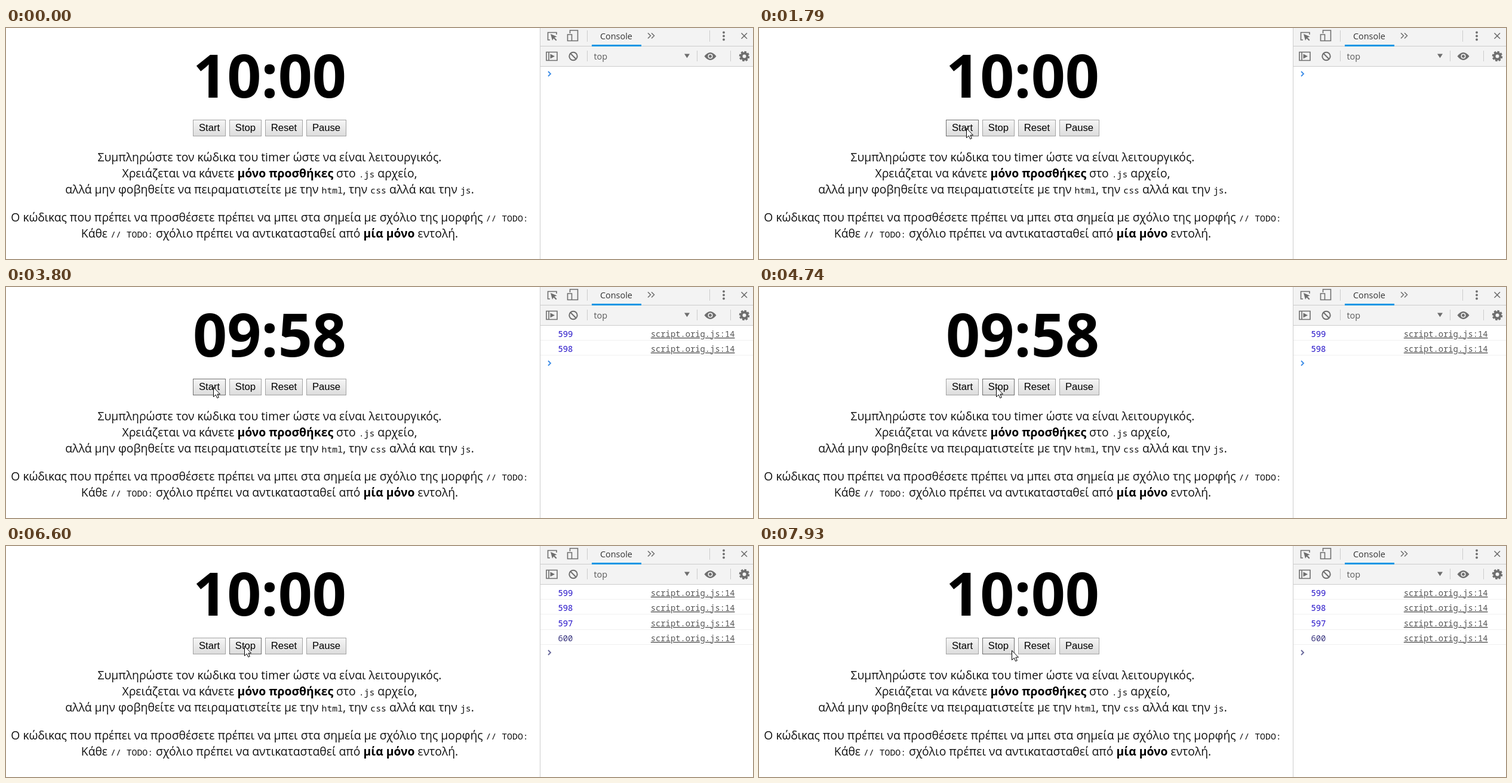
An HTML page for the animation above (8 s loop, 1251x388 px).

```html
<!DOCTYPE html>
<html lang="el">
<head>
<meta charset="utf-8">
<title>Timer</title>
<style>
  html, body { margin: 0; width: 100%; height: 100%; overflow: hidden; background: #fff; }
  svg { display: block; }
  text { font-family: "Open Sans", "Noto Sans", sans-serif; white-space: pre; }
  .clock { font-size: 100px; font-weight: 700; text-anchor: middle; }
  .body { font-size: 19.32px; text-anchor: middle; fill: #111; }
  .b { font-weight: 700; fill: #000; }
  .m { font: 14.8px "Noto Sans Mono", monospace; }
  .button text { font: 16.67px "Liberation Sans", Arial, sans-serif; text-anchor: middle; }
  .button rect { fill: url(#up); stroke: #a3a3a3; }
  .button.hover rect { stroke: #707070; }
  .button.pressed rect { fill: url(#down); stroke: #b4b4b4; }
  .row text { font: 13.8px "Noto Sans Mono", monospace; }
  .tool { font-size: 14.4px; }
  .line { fill: none; stroke: #6e6e6e; stroke-width: 1.6; }
  .solid { fill: #6e6e6e; }
  .rule { fill: none; stroke: #ccc; }
</style>
</head>
<body>
<svg width="1251" height="388" viewBox="0 0 1251 388">
  <defs>
    <linearGradient id="up" x2="0" y2="1"><stop stop-color="#f6f6f6"/><stop offset="1" stop-color="#dcdcdc"/></linearGradient>
    <linearGradient id="down" x2="0" y2="1"><stop stop-color="#dcdcdc"/><stop offset="1" stop-color="#f8f8f8"/></linearGradient>
  </defs>

  <text id="clock" class="clock" x="441.5" y="117"></text>
  <g id="buttons"></g>

  <text class="body" x="441.5" y="224">Συμπληρώστε τον κώδικα του timer ώστε να είναι λειτουργικός.</text>
  <text class="body" x="441.5" y="251">Χρειάζεται να κάνετε <tspan class="b">μόνο προσθήκες</tspan> στο <tspan class="m">.js</tspan> αρχείο,</text>
  <text class="body" x="441.5" y="278">αλλά μην φοβηθείτε να πειραματιστείτε με την <tspan class="m">html</tspan>, την <tspan class="m">css</tspan> αλλά και την <tspan class="m">js</tspan>.</text>
  <text class="body" x="441.5" y="325">Ο κώδικας που πρέπει να προσθέσετε πρέπει να μπει στα σημεία με σχόλιο της μορφής <tspan class="m">// TODO:</tspan></text>
  <text class="body" x="441.5" y="352">Κάθε <tspan class="m">// TODO:</tspan> σχόλιο πρέπει να αντικατασταθεί από <tspan class="b">μία μόνο</tspan> εντολή.</text>

  <!-- Console panel -->
  <rect x="895" width="356" height="388" fill="#fff"/>
  <rect x="895" width="356" height="64" fill="#f3f3f3"/>
  <path class="rule" d="M894.5 0V388M895 30.5H1251M895 64.5H1251M973.5 4V23M1178.5 4V23M973.5 38V56M1157.5 38V56M1213.5 38V56"/>
  <rect x="981" y="28" width="83" height="3" fill="#0a96e4"/>
  <text class="tool" x="995" y="19" fill="#333">Console</text>
  <text class="tool" x="984.5" y="53" fill="#5a5a5a">top</text>

  <path class="line" d="M922 11V7.5H907.5V20H911M1075 8.5L1079.5 13L1075 17.5M1081 8.5L1085.5 13L1081 17.5M1231.5 8.5L1241 18M1241 8.5L1231.5 18"/>
  <path class="solid" d="M912 10L922.5 14.5L918.5 16L922.5 20L921 21.5L917 17.5L915 21Z"/>
  <path class="line" d="M944.5 9V4H957.5V21.5H948M940.5 11H947.5V21.5H940.5Z"/>
  <g class="solid">
    <circle cx="1202" cy="7.5" r="1.9"/><circle cx="1202" cy="13.5" r="1.9"/><circle cx="1202" cy="19.5" r="1.9"/>
    <path d="M911.5 43.5L919 47.5L911.5 51.5ZM1136 43.5H1145L1140.5 50.5Z"/>
  </g>
  <path class="line" d="M905 40.5H923V54.5H905ZM909 40.5V54.5"/>
  <g class="line" style="stroke-width:2"><circle cx="950" cy="47.5" r="6.7"/><path d="M945.5 43L954.5 52"/></g>
  <path class="solid" d="M1169.5 47.5Q1179.5 34.5 1189.5 47.5Q1179.5 60.5 1169.5 47.5Z"/>
  <circle cx="1179.5" cy="47.5" r="3.3" fill="#6e6e6e" stroke="#f3f3f3" stroke-width="1.6"/>
  <g fill="none" stroke="#6e6e6e">
    <circle cx="1236.5" cy="47.5" r="5" stroke-width="4"/>
    <circle cx="1236.5" cy="47.5" r="7.6" stroke-width="2.4" pathLength="16" stroke-dasharray="1.2 .8"/>
  </g>

  <g id="rows"></g>
  <path id="prompt" d="M908 73L912 77L908 81" fill="none" stroke-width="1.8"/>

  <circle id="ring" r="15.5" fill="#f2e83c" fill-opacity=".72"/>
  <path id="arrow" d="M.5 .5V16.5L4.3 13L6.7 18.5L9.3 17.4L6.9 12H11.5Z" fill="#fff" stroke="#000"/>
  <path id="beam" d="M-3 -9.5H-1Q0 -9.5 0 -8.5V8.5Q0 9.5 -1 9.5H-3M3 -9.5H1Q0 -9.5 0 -8.5M0 8.5Q0 9.5 1 9.5H3" fill="none" stroke="#000"/>
</svg>
<script>
const LOOP = 8000, CURSOR_IN = 200;
const origin = [989, 354];
// start time, step length, step count, end x, end y
const moves = [
  [278, 79, 8, 464, 206],
  [1150, 80, 7, 347, 168],
  [4490, 81, 5, 403, 168],
  [6600, 80, 6, 346, 169],
  [7700, 76.5, 4, 423, 175]
];
const presses = [[1710, 1790], [5510, 5590], [7230, 7310]];
const logs = [[2810, 599], [3800, 598], [4810, 597], [5590, 600]];

const $ = id => document.getElementById(id);
const show = (el, on) => el.setAttribute("visibility", on ? "visible" : "hidden");
const place = (el, x, y) => el.setAttribute("transform", `translate(${x} ${y})`);

const buttons = [["Start", 313, 55], ["Stop", 374, 54], ["Reset", 434, 63], ["Pause", 503, 67]];
$("buttons").innerHTML = buttons.map(([label, x, w]) =>
  `<g class="button"><rect x="${x + .5}" y="154.5" width="${w - 1}" height="27"/>
   <text x="${x + w / 2}" y="173">${label}</text></g>`).join("");

$("rows").innerHTML = logs.map(([, value], i) => {
  const y = Math.round(84 + 25.4 * i);
  const color = value === 600 ? "#3c3880" : "#2310c8";
  return `<g class="row"><text x="924.5" y="${y}" fill="${color}">${value}</text>
    <text x="1220.5" y="${y}" fill="#555" text-anchor="end" text-decoration="underline">script.orig.js:14</text>
    <path d="M895 ${y + 5.5}H1251" stroke="#f0f0f0"/></g>`;
}).join("");

function cursorAt(t) {
  let [x, y] = origin;
  for (const [start, step, count, endX, endY] of moves) {
    if (t < start) break;
    const p = Math.min(1, (Math.floor((t - start) / step) + 1) / count);
    const eased = p * p * (3 - 2 * p);
    x += (endX - x) * eased;
    y += (endY - y) * eased;
  }
  return [Math.round(x), Math.round(y)];
}

function draw(t) {
  const [x, y] = cursorAt(t);
  const visible = t >= CURSOR_IN;
  const pressed = presses.some(([from, to]) => t >= from && t < to);
  const overText = x < 873 && y > 196 && !(y > 286 && y < 304);

  place($("arrow"), x, y);
  place($("beam"), x + .5, y);
  place($("ring"), x, y + .5);
  show($("arrow"), visible && !overText);
  show($("beam"), visible && overText);
  show($("ring"), pressed);

  [...$("buttons").children].forEach((el, i) => {
    const [, left, width] = buttons[i];
    const hover = visible && x >= left && x < left + width && y >= 154 && y < 182;
    el.classList.toggle("hover", hover);
    el.classList.toggle("pressed", hover && pressed);
  });

  const count = logs.filter(([time]) => t >= time).length;
  const seconds = count ? logs[count - 1][1] : 600;
  const pad = n => String(n).padStart(2, "0");
  $("clock").textContent = pad(Math.floor(seconds / 60)) + ":" + pad(seconds % 60);
  [...$("rows").children].forEach((el, i) => show(el, i < count));
  place($("prompt"), 0, Math.round(25.4 * count));
  $("prompt").setAttribute("stroke", count === logs.length ? "#66669a" : "#3b8be6");
}

function tick() {
  draw(performance.now() % LOOP);
  requestAnimationFrame(tick);
}
tick();
</script>
</body>
</html>
```
